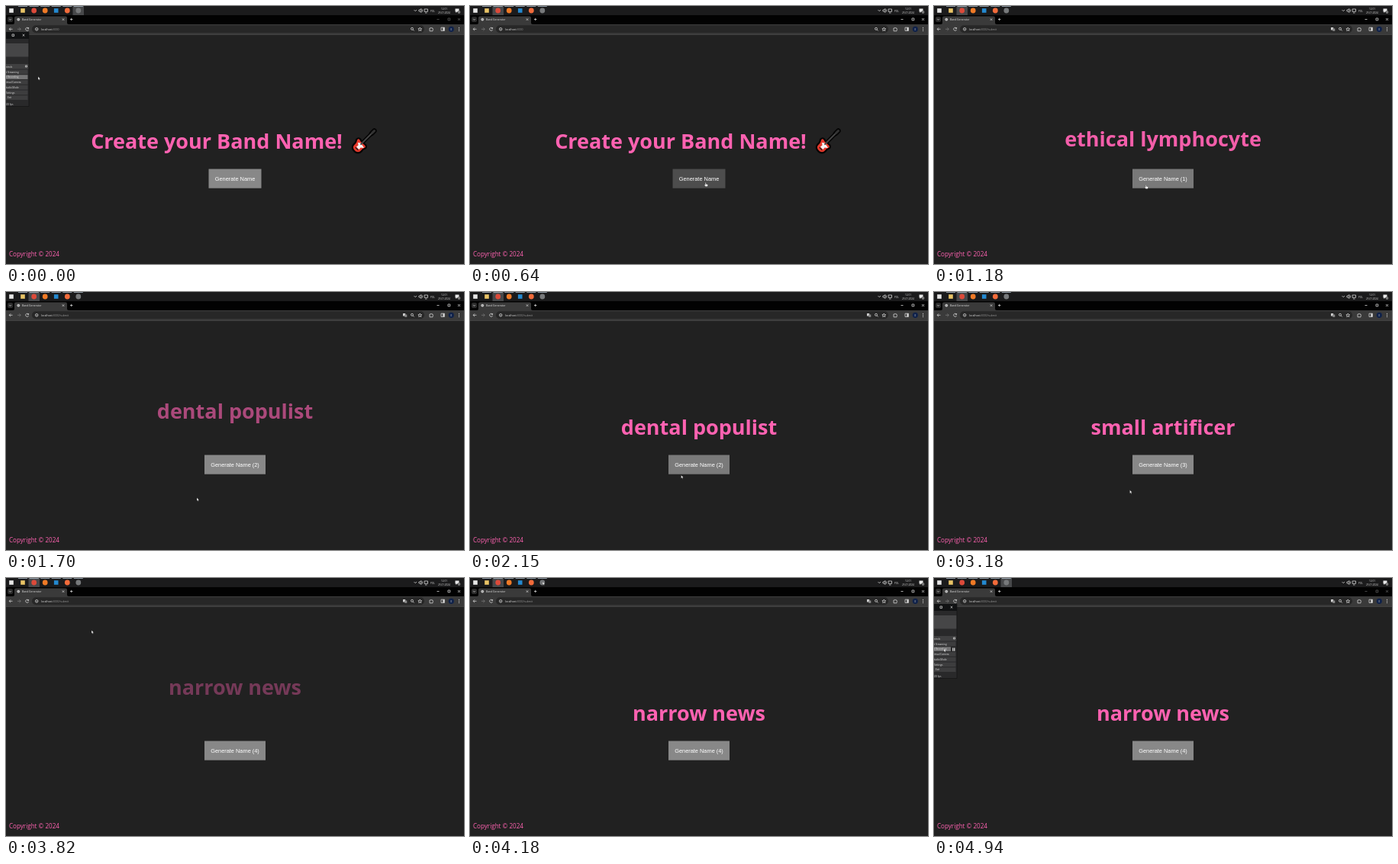
Write an HTML page that moves like this. It is 600x338 px and loops after 5210 ms.

```html
<!DOCTYPE html>
<html lang="en">
<head>
<meta charset="utf-8">
<title>Band Generator</title>
<style>
  html, body { margin: 0; width: 100%; height: 100%; overflow: hidden; background: #212121; }
  svg { display: block; width: 100%; height: 100%; }
  text { font-family: "Open Sans", "Noto Sans", sans-serif; white-space: pre; }
  .heading { font-size: 27px; font-weight: 700; fill: #ff62b1; text-anchor: middle; }
  .label { font: 7.4px "Liberation Sans", Arial, sans-serif; fill: #fff; text-anchor: middle; }
  .copy { font-size: 8.1px; fill: #ff62b1; }
  .ui { font-size: 3.5px; fill: #e4e4e4; }
  .tiny { font-size: 3.1px; fill: #dcdcdc; }
  .line { fill: none; stroke: #d2d2d2; stroke-width: .8; }
</style>
</head>
<body>
<svg viewBox="0 0 600 338" preserveAspectRatio="none">
  <rect width="600" height="338" fill="#212121"/>

  <!-- taskbar -->
  <rect width="600" height="12" fill="#1b1b1c"/>
  <rect id="browserTask" x="29.5" width="14.5" height="12" fill="#47484a"/>
  <rect id="recorderTask" x="87.5" width="14.5" height="12" fill="#47484a"/>
  <g id="tasks"></g>
  <path class="line" d="M534.5 5l1.7 1.7L538 5M541 5h1.3l1.5-1.5v5L542.300 7H541zM545 4.300q1 1.700 0 3.400M548 4h4.500v3.300H548zM549 9h2.500" stroke-width=".6"/>
  <text class="tiny" x="556" y="7.500">POL</text>
  <text class="tiny" x="574" y="4.600" text-anchor="middle">12:01</text>
  <text class="tiny" x="574" y="10" text-anchor="middle">25.01.2024</text>
  <path d="M588.500 3.500h5v4h-2.500l-1.500 1.500V7.500h-1z" fill="#e8e8e8"/>
  <circle cx="593.500" cy="8" r="1.900" fill="#777"/>

  <!-- browser tabs -->
  <rect y="12" width="600" height="12" fill="#020202"/>
  <path d="M9 24q2 0 2-2v-6.500q0-2 2-2h65q2 0 2 2V22q0 2 2 2z" fill="#3a3a3a"/>
  <rect x="2" y="14" width="7" height="7" rx="2" fill="#2c2c2c"/>
  <path class="line" d="M4.200 17l1.300 1.300L6.800 17" stroke-width=".6"/>
  <circle cx="16.300" cy="17.600" r="1.900" fill="#d0d0d0"/>
  <path d="M15 17l1.500 1 1-1.500" fill="none" stroke="#555" stroke-width=".5"/>
  <text class="ui" x="21" y="18.900" style="font-size:3.400px">Band Generator</text>
  <path class="line" d="M73.800 16.400l2.400 2.400m0-2.400l-2.400 2.400M84 17.500h3.400m-1.700-1.700v3.400" stroke-width=".6"/>
  <path id="controls" class="line" d="M564.500 17.500h3M579 16h2.800v2.800H579zM592 16l3 3m0-3l-3 3" stroke-width=".6"/>

  <!-- browser toolbar -->
  <rect y="24" width="600" height="13" fill="#3a3a3a"/>
  <rect y="37" width="600" height=".8" fill="#4a4a4a"/>
  <rect x="34" y="25.300" width="514" height="10" rx="5" fill="#272727"/>
  <path class="line" d="M8.500 30.300h-4.300m1.900-1.900l-1.900 1.900 1.900 1.900"/>
  <path class="line" d="M15 30.300h4.300m-1.900-1.900l1.900 1.900-1.900 1.900" style="stroke:#777"/>
  <path class="line" d="M29.400 29.200a2 2 0 1 0 .200 1.800M29.600 28v1.600H28"/>
  <circle class="line" cx="40.200" cy="30.300" r="1.800" stroke-width=".6"/>
  <path class="line" d="M40.200 29.800v1.500" stroke-width=".5"/>
  <text class="ui" x="46" y="31.800">localhost<tspan id="path" fill="#979797">:3000</tspan></text>
  <g id="translate">
    <rect x="520" y="28" width="3.200" height="3.500" fill="#ccc"/>
    <rect x="522.300" y="29.500" width="3" height="3.300" fill="#888"/>
  </g>
  <circle class="line" cx="532" cy="29.800" r="1.500"/>
  <path class="line" d="M533.200 31l1.500 1.500"/>
  <path class="line" d="M542.300 28l.7 1.600 1.700.2-1.300 1.100.4 1.700-1.500-.9-1.500.9.4-1.700-1.300-1.100 1.700-.2z" stroke-width=".6"/>
  <path class="line" d="M555 29h1.400q.6-1.500 1.200 0h1.400v1.300q1.300.6 0 1.200v1.300h-4z"/>
  <path class="line" d="M570 28.200h4.400v4.200H570z"/>
  <path d="M572.300 28.200h2.100v4.200h-2.100z" fill="#d2d2d2"/>
  <circle cx="583.300" cy="30.300" r="3.600" fill="#10224a"/>
  <text class="tiny" x="583.300" y="31.500" text-anchor="middle">E</text>
  <g fill="#ddd"><circle cx="593.500" cy="28.300" r=".6"/><circle cx="593.500" cy="30.300" r=".6"/><circle cx="593.500" cy="32.300" r=".6"/></g>

  <!-- page -->
  <text id="heading" class="heading" y="187"></text>
  <g id="guitar" stroke-linecap="round" stroke-linejoin="round">
    <path d="M465 181L481 165" stroke="#050505" stroke-width="5"/>
    <path d="M479 167l3.500-3.500" stroke="#050505" stroke-width="6.500"/>
    <path d="M459 175q3-3.500 5.500 0l1 2 5.500 5q2.500 3-1 4.800-3 .8-4 3.200-4 4.500-9 .8-5.500-4.800-1.700-9.300 3.500-2.500 3.700-6.500z" fill="#e8392c" stroke="#050505" stroke-width="2.200"/>
    <path d="M461 179l3.500.5 3 4 1.500 2.500-4.500-.5-2 2.500-3.500-3.500 2.500-2z" fill="#f4f4f4"/>
    <path d="M465 181L480 166" stroke="#454545" stroke-width="1.800"/>
    <path d="M479.500 166.500l3-3" stroke="#333" stroke-width="3"/>
    <path d="M458 185.500l3 3" stroke="#222" stroke-width="1.200"/>
  </g>
  <rect id="button" y="213.500" height="25.200"/>
  <text id="label" class="label" x="300" y="228.700"></text>
  <text class="copy" x="4" y="327.800">Copyright © 2024</text>

  <!-- recorder window -->
  <g id="recorder">
    <rect y="34" width="30" height="97.500" fill="#29292a"/>
    <rect y="34" width="30" height="9" fill="#111213"/>
    <path class="line" d="M8 37h2.600v2.600H8zM21.700 37l2.600 2.600m0-2.600l-2.600 2.600" stroke-width=".6"/>
    <rect y="49" width="29.500" height="17.500" fill="#464647"/>
    <rect y="76" width="29.500" height="6.500" fill="#404041"/>
    <path class="line" d="M25.500 78h2v2h-2z" stroke-width=".5"/>
    <text class="tiny" x="0" y="80.500">ntrols</text>
    <g id="rows"></g>
    <path id="pause" d="M24.800 91.500v4.200m2-4.200v4.200" stroke="#eee" stroke-width="1.100"/>
    <text class="tiny" x="-2" y="129.500">0.00 fps</text>
    <path d="M30 34v97.500H0" fill="none" stroke="#111" stroke-width=".6"/>
  </g>

  <g id="pointer">
    <path id="arrow" d="M0-1.500v4.200l1-.9.700 1.500.7-.3-.7-1.500h1.300z" fill="#fff" stroke="#111" stroke-width=".3"/>
    <path id="hand" d="M-.8-1.500q.5-.6 1 0V.2l2 .5q.5.300.3 1.200L2 3.500H-.5L-2 1.500l.5-.6.7.500z" fill="#fff" stroke="#222" stroke-width=".3"/>
  </g>
</svg>
<script>
const LOOP = 5210, DROP = 440, REST = 300;
const PINK_RISE = -55;
const el = id => document.getElementById(id);
const SVG = "http://www.w3.org/2000/svg";

function add(parent, tag, attrs, content = "") {
  const node = document.createElementNS(SVG, tag);
  for (const key in attrs) node.setAttribute(key, attrs[key]);
  node.textContent = content;
  el(parent).append(node);
  return node;
}

// Plain shapes stand for the taskbar icons.
const icons = [
  ["s", 7, "#e6e6e6"], ["s", 22, "#e9c466"], ["c", 36.7, "#dc4a3a"], ["c", 51.2, "#f07a26"],
  ["s", 65.7, "#2489d0"], ["c", 80.3, "#f26b3a"], ["c", 94.8, "#77797b"]
];
icons.forEach(([shape, x, fill], i) => {
  if (shape === "c") add("tasks", "circle", { cx: x, cy: 6, r: 3.4, fill });
  else add("tasks", "rect", { x: x - 2.8, y: 3.2, width: 5.6, height: 5.6, fill });
  if (i) add("tasks", "rect", { x: x - 6, y: 0, width: 12, height: .8, fill: "#a9b7c2" });
});

const rows = ["t Streaming", "t Recording", "irtual Camera", "tudio Mode", "Settings", "Exit"].map((name, i) => {
  const y = 83.500 + i * 6.750;
  const box = add("rows", "rect", { x: 0, y, width: 28.500, height: 5.700, fill: "#3d3d3e" });
  add("rows", "text", { class: "tiny", x: name === "Exit" ? 2 : 0, y: y + 4 }, name);
  return box;
});
rows[1].setAttribute("fill", "#747475");

const pages = [
  [0, "Create your Band Name!"], [762, "ethical lymphocyte"], [1427, "dental populist"],
  [2307, "small artificer"], [3653, "narrow news"]
];

// time, x, y
const path = [
  [0, 42, 94], [60, 42, 94], [180, 120, 130], [440, 300, 226], [600, 309, 233], [762, 309, 233],
  [940, 272, 266], [1080, 264, 268], [1180, 278, 236], [1290, 290, 229], [1430, 290, 229],
  [1700, 250, 271], [2040, 247, 274], [2210, 288, 229], [2320, 288, 229], [2580, 236, 283],
  [2950, 234, 281], [3250, 260, 258], [3420, 285, 228], [3653, 285, 228], [3820, 112, 70],
  [4040, 97, 12], [4200, 95, 6], [4400, 95, 6], [4640, 24, 82], [4840, 13, 94], [LOOP, 13, 94]
];

// time, amount of dark hover colour
const hover = [
  [0, 0], [400, 0], [500, 1], [800, 1], [890, 0], [1160, 0], [1240, 1], [1480, 1], [1570, 0],
  [2130, 0], [2220, 1], [2370, 1], [2460, 0], [3360, 0], [3450, 1], [3670, 1], [3750, 0], [LOOP, 0]
];

function sample(table, t, ease = k => k) {
  const i = Math.max(1, table.findIndex(step => step[0] > t));
  const a = table[i - 1], b = table[i];
  const k = ease((t - a[0]) / (b[0] - a[0]));
  return a.slice(1).map((v, j) => v + (b[j + 1] - v) * k);
}

const smooth = k => k * k * (3 - 2 * k);
const show = (id, on) => el(id).setAttribute("visibility", on ? "visible" : "hidden");
const set = (id, key, value) => el(id).setAttribute(key, value);

function draw(t) {
  const index = pages.findLastIndex(page => page[0] <= t);
  const [start, name] = pages[index];
  const progress = index ? Math.min(1, (t - start) / DROP) : 1;
  el("heading").textContent = name;
  set("heading", "x", index ? REST : 276);
  set("heading", "transform", `translate(0 ${PINK_RISE * (1 - progress)})`);
  set("heading", "opacity", progress);
  show("guitar", !index);

  const width = index ? 80 : 69;
  const [dark] = sample(hover, t);
  const gray = Math.round(136 - 59 * dark);
  set("button", "x", REST - width / 2);
  set("button", "width", width);
  set("button", "fill", `rgb(${gray},${gray},${gray})`);
  el("label").textContent = "Generate Name" + (index ? ` (${index})` : "");
  el("path").textContent = index ? ":3000/submit" : ":3000";
  show("translate", index);

  const recording = t > 2000;
  const open = t < 150 || t >= 4300;
  show("recorder", open);
  show("recorderTask", open);
  show("browserTask", !open);
  show("pause", open && recording);
  rows[1].setAttribute("width", recording ? 22 : 28.5);
  set("controls", "opacity", open ? .4 : 1);

  const [x, y] = sample(path, t, smooth);
  const over = Math.abs(x - REST) < width / 2 && Math.abs(y - 226) < 12.6;
  set("pointer", "transform", `translate(${x} ${y})`);
  show("arrow", !over);
  show("hand", over);
}

const begin = performance.now();
function tick() {
  draw((performance.now() - begin) % LOOP);
  requestAnimationFrame(tick);
}
draw(0);
requestAnimationFrame(tick);
</script>
</body>
</html>
```
